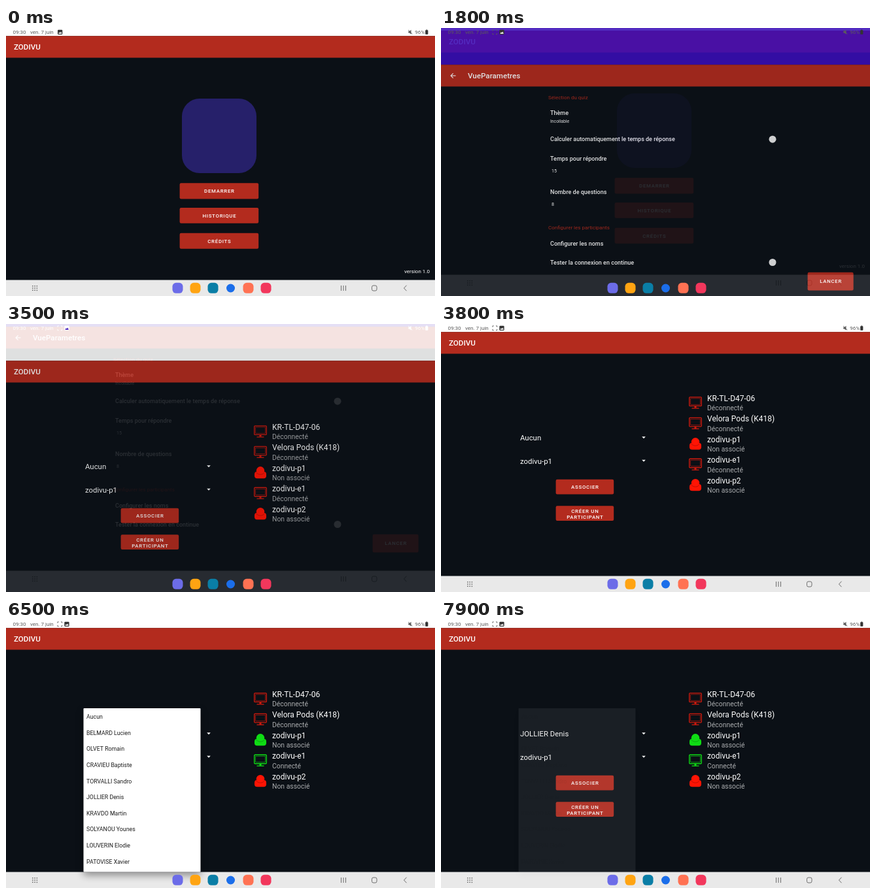
An HTML page with a canvas for the animation above (8000 ms loop, 656 px wide and 410 px high).

```html
<!DOCTYPE html>
<html lang="fr">
<head>
<meta charset="utf-8">
<title>Quiz</title>
<style>
html, body { margin: 0; width: 100%; height: 100%; overflow: hidden; background: #0b1016; }
canvas { display: block; width: 656px; height: 410px; }
</style>
</head>
<body>
<canvas id="stage" width="656" height="410"></canvas>
<script>
const W = 656, H = 410, LOOP = 8000, STEP = 100;
const BG = '#0b1016', RED = '#b32b1e', NAV = '#e9e9e9', GREY = '#5c5c5c';
const APP = 'ZODIVU';
const NAMES = ['Aucun', 'BELMARD Lucien', 'OLVET Romain', 'CRAVIEU Baptiste', 'TORVALLI Sandro',
  'JOLLIER Denis', 'KRAVDO Martin', 'SOLYANOU Younes', 'LOUVERIN Elodie', 'PATOVISE Xavier'];
const CHOSEN = 5;

// Key moments in ms
const PARAMS_AT = 1740, PAIRING_AT = 3440, POPUP_AT = 4960, PICK_AT = 7400, CLOSE_AT = 7690;

const stage = document.getElementById('stage').getContext('2d');
const layer = Object.assign(document.createElement('canvas'), { width: W, height: H });
const layerCtx = layer.getContext('2d');
let c = stage;

const clamp = v => Math.max(0, Math.min(1, v));

function rect(x, y, w, h, color, radius = 0) {
  c.fillStyle = color;
  c.beginPath();
  c.roundRect(x, y, w, h, radius);
  c.fill();
}

function disc(x, y, r, color) {
  c.fillStyle = color;
  c.beginPath();
  c.arc(x, y, r, 0, 7);
  c.fill();
}

function line(points, color, width = 1) {
  c.strokeStyle = color;
  c.lineWidth = width;
  c.beginPath();
  points.forEach(([x, y]) => c.lineTo(x, y));
  c.stroke();
}

// y is the middle of the capitals
function text(str, x, y, size, color = '#fff', { weight = 400, align = 'left', spacing = 0 } = {}) {
  c.font = `${weight} ${size}px Roboto, sans-serif`;
  c.letterSpacing = spacing + 'px';
  c.textAlign = align;
  c.fillStyle = color;
  c.fillText(str, x + (align === 'center' ? spacing / 2 : 0), y + size * 0.355);
}

function button(label, x, y, w, h, ripple = 0) {
  rect(x - 0.4, y - 0.3, w + 0.6, h + 0.8, RED, 2.2);
  if (ripple > 0 && ripple < 1) {
    c.save();
    c.beginPath();
    c.roundRect(x, y, w, h, 2);
    c.clip();
    disc(x + w / 2, y + h / 2, w * (0.2 + 0.5 * ripple), `rgba(255,255,255,${0.22 * (1 - ripple)})`);
    c.restore();
  }
  const lines = label.split('\n');
  lines.forEach((str, i) => text(str, x + w / 2, y + h / 2 + (lines.length > 1 ? i * 9.5 - 3.3 : 0.2), 7.8, '#fff',
    { weight: 500, align: 'center', spacing: 0.75 }));
}

function frameScreen(title, statusColor, titleX) {
  rect(0, 0, W, H + 60, BG);
  rect(0, -200, W, 212.3, statusColor);
  rect(0, 12.3, W, 33.3, RED);
  text(title, titleX, 29.2, 11.6, '#fff', { weight: 500 });
  rect(0, 385.5, W, 90, NAV);
  const ink = '#6b6b6b';
  for (let i = 0; i < 9; i++) rect(40 + i % 3 * 3.3, 394 + Math.floor(i / 3) * 3.3, 1.5, 1.5, ink);
  for (const x of [512.5, 516, 519.5]) line([[x, 394], [x, 402]], ink);
  c.strokeStyle = ink;
  c.beginPath();
  c.roundRect(559.5, 394, 7.5, 8, 2.3);
  c.stroke();
  line([[612.5, 393.7], [608.5, 398], [612.5, 402.2]], ink);
}

function homeScreen(t) {
  frameScreen(APP, '#fff', 12);
  rect(269, 108, 114, 114, '#26206a', 27);
  button('DEMARRER', 266, 237.5, 120, 23.5, (t - 1150) / 430);
  button('HISTORIQUE', 266, 275.3, 120, 23);
  button('CRÉDITS', 266, 314, 120, 23.3);
  text('version 1.0', 609, 372, 8);
}

function paramsScreen() {
  frameScreen('VueParametres', '#3a0db8', 41);
  line([[22.5, 29], [15, 29]], '#fff', 1.1);
  line([[18.6, 25.3], [15, 29], [18.6, 32.7]], '#fff', 1.1);
  const bold = { weight: 500 };
  text('Sélection du quiz', 164, 61.7, 8, RED);
  text('Thème', 167, 85.5, 9, '#fff', bold);
  text('Incollable', 167, 98.5, 6.8);
  text('Calculer automatiquement le temps de réponse', 167, 126.3, 9, '#fff', bold);
  text('Temps pour répondre', 167, 156.3, 9, '#fff', bold);
  text('15', 169, 174.3, 7.1);
  text('Nombre de questions', 167, 207.3, 9, '#fff', bold);
  text('8', 169, 225.3, 7.1);
  text('Configurer les participants', 164, 261.5, 8, RED);
  text('Configurer les noms', 167, 285.5, 9, '#fff', bold);
  text('Tester la connexion en continue', 167, 314.7, 9, '#fff', bold);
  disc(507, 126.2, 5.5, '#ececec');
  disc(507, 314.5, 5.5, '#ececec');
  button('LANCER', 561, 330, 69.5, 27);
}

function monitor(x, y, color) {
  c.strokeStyle = color;
  c.lineWidth = 1.3;
  c.beginPath();
  c.roundRect(x - 9.3, y - 8.5, 18.6, 13.5, 1);
  c.stroke();
  c.lineWidth = 0.6;
  c.strokeRect(x - 7.3, y - 6.5, 14.6, 9.3);
  line([[x, y + 5], [x, y + 8]], color, 3);
  line([[x - 5.5, y + 8.5], [x + 5.5, y + 8.5]], color, 1.3);
}

function buzzer(x, y, color) {
  disc(x, y - 3, 6.2, color);
  rect(x - 9, y - 1.5, 18, 10.5, color, 4);
  c.strokeStyle = 'rgba(0,0,0,.35)';
  c.lineWidth = 0.7;
  c.beginPath();
  c.arc(x, y - 5, 8, 0.65, 2.5);
  c.stroke();
}

function pairingScreen(t) {
  frameScreen(APP, '#fff', 12);
  const p1 = t >= 5300, e1 = t >= 6000;
  const devices = [
    ['KR-TL-D47-06', 'Déconnecté', monitor, false],
    ['Velora Pods (K418)', 'Déconnecté', monitor, false],
    ['zodivu-p1', 'Non associé', buzzer, p1],
    ['zodivu-e1', e1 ? 'Connecté' : 'Déconnecté', monitor, e1],
    ['zodivu-p2', 'Non associé', buzzer, false]
  ];
  devices.forEach(([name, state, icon, on], i) => {
    const y = 113.7 + i * 31.45;
    icon(389, y + 6.7, on ? '#0fdc14' : icon === buzzer ? '#ff1404' : '#d01a0e');
    text(name, 407, y, 12);
    text(state, 407, y + 14.9, 10.4, '#a9abad');
  });
  [[t < CLOSE_AT ? NAMES[0] : NAMES[CHOSEN], 174], ['zodivu-p1', 209.5]].forEach(([label, y]) => {
    text(label, 121, y, 11.4);
    c.fillStyle = '#fff';
    c.beginPath();
    c.moveTo(307.2, y - 1.8);
    c.lineTo(312.8, y - 1.8);
    c.lineTo(310, y + 1.2);
    c.fill();
  });
  button('ASSOCIER', 176, 238, 88, 22);
  button('CRÉER UN\nPARTICIPANT', 176, 278.5, 88, 22);
}

function popup(t) {
  const alpha = t < CLOSE_AT ? clamp((t - POPUP_AT) / 220) : clamp(1 - (t - CLOSE_AT) / 225);
  if (!alpha) return;
  c.save();
  c.globalAlpha = alpha;
  c.shadowColor = 'rgba(0,0,0,.4)';
  c.shadowBlur = 12;
  c.shadowOffsetY = 5;
  rect(118.5, 135, 179, 250.5, '#fff', 1);
  c.shadowColor = 'transparent';
  if (t >= PICK_AT) {
    const press = clamp((t - PICK_AT + 100) / 200);
    rect(118.5, 258.3, 179, 24.6, `rgba(0,0,0,${0.13 * press})`);
  }
  NAMES.forEach((name, i) => text(name, 123, 148 + i * 24.6, 8.8, '#1c1c1c'));
  c.restore();
}

function statusBar(t, ink, paper) {
  const solid = ink === '#fff' ? ink : '#333';
  text('09:30', 10.5, 6.5, 8, ink);
  text('ven. 7 juin', 37, 6.5, 8, ink);
  let x = 79;
  if (t >= 300) {
    for (const [sx, sy] of [[-1, -1], [1, -1], [1, 1], [-1, 1]]) {
      const px = 82.3 + sx * 3.4, py = 6.3 + sy * 3.4;
      line([[px - sx * 1.8, py], [px, py], [px, py - sy * 1.8]], ink, 0.9);
    }
    if (Math.floor(t / 500) % 2 === 0) {
      c.strokeStyle = ink;
      c.lineWidth = 1.1;
      c.beginPath();
      c.arc(82.3, 6.3, 1.4, 0, 7);
      c.stroke();
    }
    x = 89.3;
  }
  rect(x, 2.7, 7.3, 7.3, solid, 1.2);
  c.fillStyle = paper;
  c.beginPath();
  for (const [dx, dy] of [[1, 8.8], [2.6, 6.2], [3.6, 7.4], [5, 5.4], [6.5, 8.8]]) c.lineTo(x + dx, dy);
  c.fill();

  c.fillStyle = ink;
  c.beginPath();
  for (const [px, py] of [[615.3, 5], [617, 5], [619.5, 2.8], [619.5, 9.8], [617, 7.6], [615.3, 7.6]]) c.lineTo(px, py);
  c.fill();
  line([[615.2, 3], [621.3, 9.4]], ink, 0.9);
  text('96%', 625.3, 6.5, 8, ink);
  rect(641.2, 3.3, 4.2, 6.4, solid, 0.8);
  rect(642.4, 2.5, 1.8, 1, solid);
}

function dock() {
  ['#6c6ce8', '#ffa412', '#0a7ea6', '#1b6eea', '#ff7253', '#f2375c'].forEach((color, i) => {
    const x = 262.5 + i * 27;
    if (i === 3) disc(x, 398, 6.5, color);
    else rect(x - 8, 389.8, 16, 16, color, 5.5);
  });
}

// The new screen slides up and fades in while the old one drifts away
function transition(from, to, dt, t) {
  if (dt > 330) return to(t);
  const left = Math.exp(-dt / 73);
  c.save();
  c.translate(0, Math.round(-13.5 * (1 - left)));
  from(t);
  c.restore();

  c = layerCtx;
  c.save();
  c.clearRect(0, 0, W, H);
  c.translate(0, Math.round(100 * left));
  to(t);
  c.restore();

  c = stage;
  c.globalAlpha = clamp(dt / 69);
  c.drawImage(layer, 0, 0);
  c.globalAlpha = 1;
}

function draw(t) {
  c = stage;
  c.clearRect(0, 0, W, H);
  if (t < PARAMS_AT) homeScreen(t);
  else if (t < PAIRING_AT) transition(homeScreen, paramsScreen, t - PARAMS_AT, t);
  else transition(paramsScreen, pairingScreen, t - PAIRING_AT, t);

  const light = t >= PARAMS_AT + 100 && t < PAIRING_AT + 100;
  statusBar(t, light ? '#fff' : GREY, light ? '#3a0db8' : '#fff');
  if (t >= POPUP_AT) popup(t);
  dock();
}

function tick() {
  draw(Math.floor(performance.now() % LOOP / STEP) * STEP);
  requestAnimationFrame(tick);
}
tick();
</script>
</body>
</html>
```
